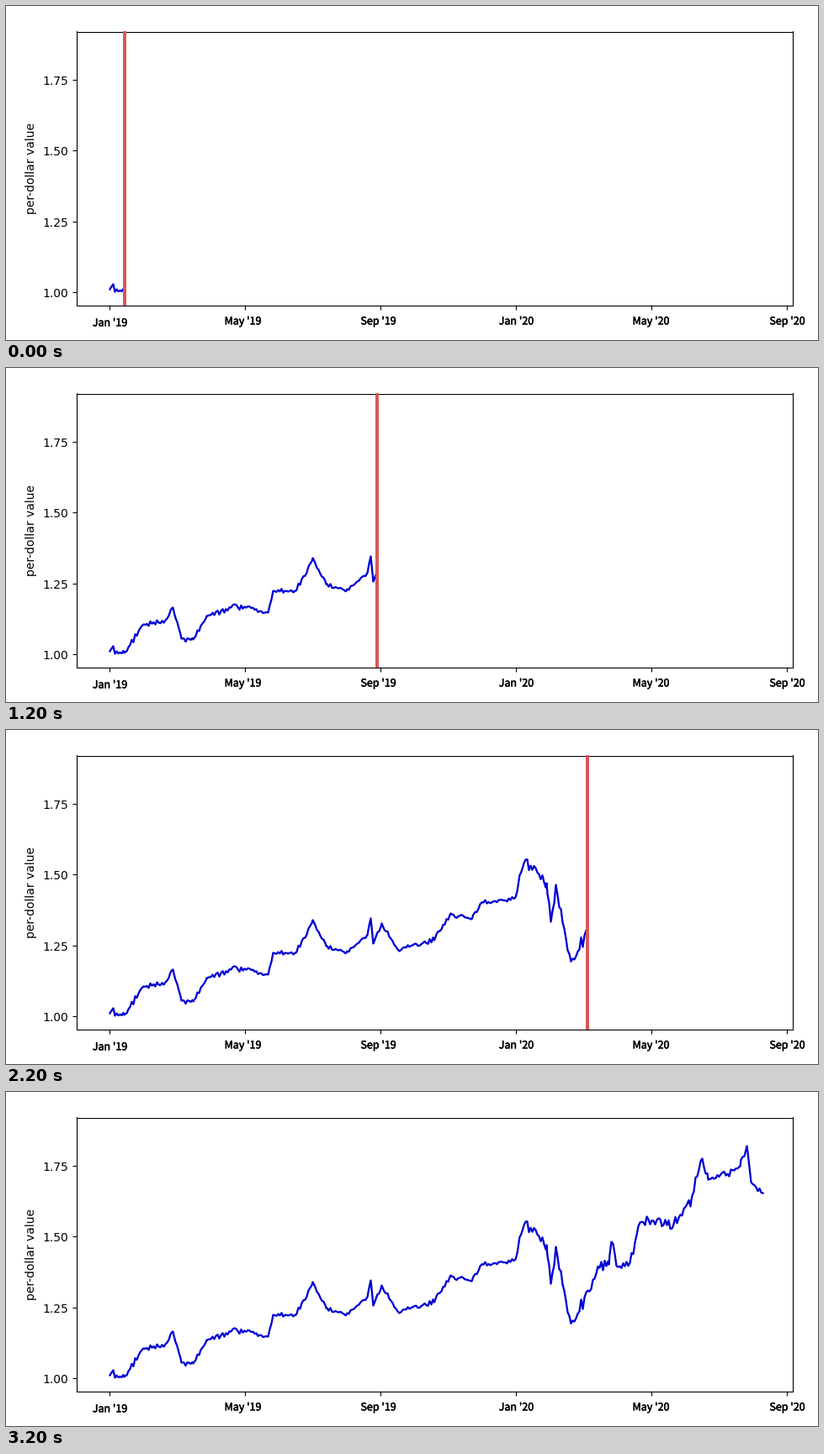
These frames come from a looping animation (965x398 px, 3.4 s). A matplotlib script:

```python
import numpy as np
import matplotlib.pyplot as plt
from matplotlib import patheffects
from matplotlib.animation import FuncAnimation

WIDTH, HEIGHT, DPI = 965, 398, 100
LEFT, RIGHT, TOP, BOTTOM = 83, 934, 30, 356
FRAMES, INTERVAL = 17, 200
BAR_START, BAR_STEP = 140.5, 50

# Main turning points of the price curve, in stage pixels.
TURNS = np.array([
    (123, 337), (127, 331), (129, 340), (140, 339), (163, 305), (187, 303),
    (198, 285), (208, 322), (222, 323), (238, 295), (274, 283), (311, 291),
    (317, 265), (344, 265), (364, 226), (380, 257), (404, 265), (428, 245),
    (433, 224), (436, 254), (446, 230), (465, 261), (508, 250), (528, 218),
    (553, 225), (564, 206), (605, 199), (610, 172), (617, 154), (642, 182),
    (647, 228), (653, 184), (667, 262), (677, 269), (704, 209), (716, 205),
    (719, 178), (727, 208), (741, 203), (753, 155), (775, 150), (792, 160),
    (814, 128), (826, 80), (834, 104), (855, 99), (872, 88), (880, 64),
    (885, 107), (899, 120),
], dtype=float)


def price_curve():
    """Daily curve through the turning points with slight market noise."""
    turn_x, turn_y = TURNS.T
    x = np.union1d(np.arange(turn_x[0], turn_x[-1], 2), turn_x)
    swing = np.interp(x, [600, 640, 800, 820], [1.6, 4, 4, 2])
    noise = np.random.default_rng(4).normal(0, 1, x.size) * swing
    noise[np.isin(x, turn_x)] = 0
    return x, np.interp(x, turn_x, turn_y) + noise


def points(pixels):
    return pixels * 72 / DPI


plt.rcParams["font.family"] = "DejaVu Sans"
fig = plt.figure(figsize=(WIDTH / DPI, HEIGHT / DPI), dpi=DPI, facecolor="white")
ax = fig.add_axes([
    (LEFT + 0.5) / WIDTH, 1 - (BOTTOM + 0.5) / HEIGHT,
    (RIGHT - LEFT) / WIDTH, (BOTTOM - TOP) / HEIGHT,
])
ax.set_xlim(LEFT, RIGHT)
ax.set_ylim(BOTTOM, TOP)
ax.set_yticks([341, 257, 172, 88], ["1.00", "1.25", "1.50", "1.75"])
ax.set_ylabel("per-dollar value")

months = ["Jan '19", "May '19", "Sep '19", "Jan '20", "May '20", "Sep '20"]
label_x = [123, 281, 442, 606, 766, 928]
ax.set_xticks(122 + 161 * np.arange(len(months)), [""] * len(months))
for i, (x, month) in enumerate(zip(label_x, months)):
    ax.text(x, 381 if i == 0 else 379, month, ha="center", va="baseline",
            family="Noto Sans CJK JP", size=9,
            path_effects=[patheffects.withStroke(linewidth=0.35, foreground="black")])

curve_x, curve_y = price_curve()
curve, = ax.plot([], [], color="#0000d4", lw=points(2.3), zorder=2)
bar, = ax.plot([], [], color="#d95757", lw=points(4), zorder=5,
               solid_capstyle="butt", clip_on=False)


def update(frame):
    x = BAR_START + BAR_STEP * frame
    shown = curve_x <= x
    curve.set_data(curve_x[shown], curve_y[shown])
    bar.set_data([x, x], [TOP - 0.5, BOTTOM + 0.5])
    bar.set_visible(x < RIGHT)
    return curve, bar


anim = FuncAnimation(fig, update, frames=FRAMES, interval=INTERVAL,
                     repeat=True, repeat_delay=0)
plt.show()
```
